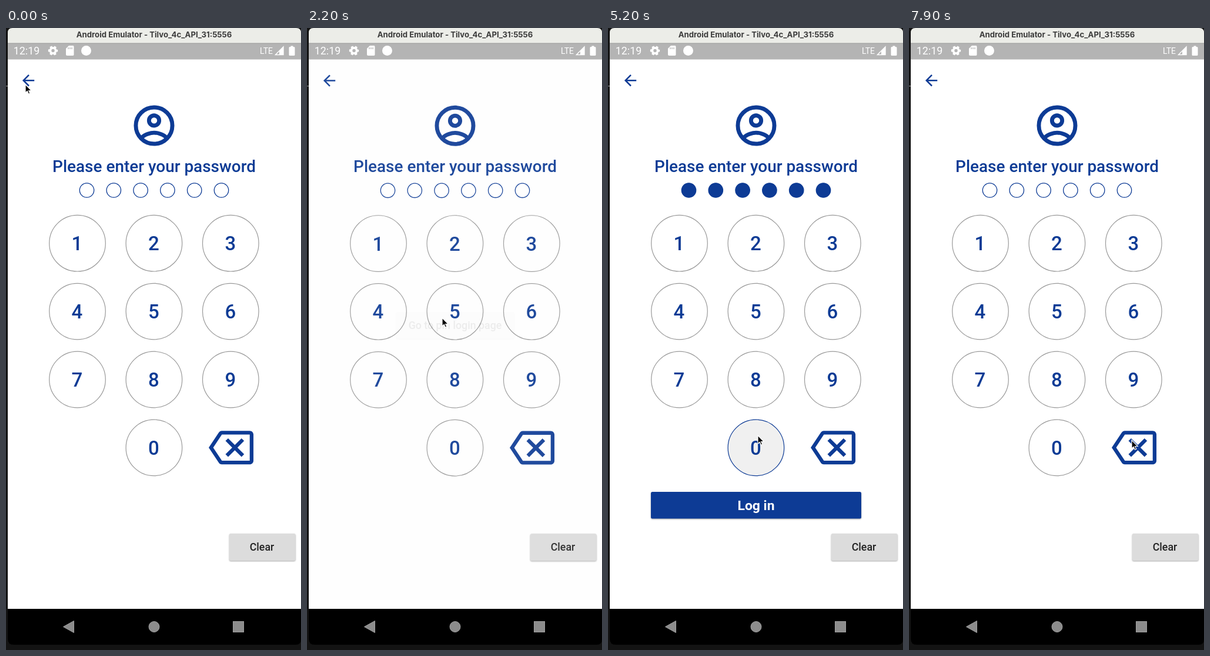
These frames come from a looping animation (502 by 1058 pixels, 8000 ms). An HTML page:

```html
<!DOCTYPE html>
<html lang="en">
<head>
<meta charset="utf-8">
<title>PIN login</title>
<style>
html, body { margin: 0; width: 100%; height: 100%; overflow: hidden; background: #121212; }
svg { display: block; }
text { font-family: Roboto, sans-serif; font-weight: 500; text-anchor: middle; }
.blue { fill: #0d3b95; }
.raised { filter: drop-shadow(0 1.5px 1.2px rgba(0, 0, 0, .35)); }
.label { font-size: 17.8px; fill: #222; }
</style>
</head>
<body>
<svg width="502" height="1058" viewBox="0 0 502 1058">
  <defs><clipPath id="screen"><rect x="3" y="26" width="499" height="962"/></clipPath></defs>
  <rect width="502" height="1058" fill="#131313"/>
  <rect y="98" width="3" height="1.5" fill="#777"/>
  <path d="M3 900H502V1040Q502 1049 493 1049H13Q3 1049 3 1039Z"/>
  <path d="M3 26V8Q3 0 11 0H494Q502 0 502 8V26Z" fill="#ecede8"/>
  <text x="252" y="16" style="font:700 13.2px Inter,sans-serif" fill="#3b3b3b">Android Emulator - Tilvo_4c_API_31:5556</text>

  <g clip-path="url(#screen)">
    <rect x="3" y="26" width="499" height="962" fill="#fafafa"/>
    <rect id="homeButton" class="raised" x="152" y="483" width="200.500" height="45.500" rx="2.500"/>
    <text class="label" x="252" y="512">Go to pin login page</text>
    <g id="page">
      <rect x="3" y="26" width="499" height="962" fill="#fff"/>
      <path class="blue" transform="translate(22.800 74) scale(1.270)" d="M20 11H7.830l5.590-5.590L12 4l-8 8 8 8 1.410-1.410L7.830 13H20v-2z"/>
      <g transform="translate(252 166) scale(3.450)" fill="none" stroke="#0d3b95" stroke-width="2">
        <circle r="9"/>
        <circle cy="-2.500" r="2.500"/>
        <path d="M-6 5.900C-4.800 4.300 -1.600 3.500 0 3.500S4.800 4.300 6 5.900"/>
      </g>
      <text class="blue" x="252" y="245" font-size="27.900">Please enter your password</text>
      <g id="dots" stroke="#0d3b95" stroke-width="1.300"></g>
      <g id="keys"></g>
      <path class="blue" transform="translate(345 675.700) scale(3.170)" d="M22 3H7c-.69 0-1.230.35-1.590.88L0 12l5.410 8.110c.36.53.9.89 1.590.89h15c1.100 0 2-.9 2-2V5c0-1.100-.9-2-2-2zm0 16H7.070L2.400 12l4.660-7H22v14zm-11.590-2L14 13.410 17.590 17 19 15.590 15.410 12 19 8.410 17.590 7 14 10.590 10.410 7 9 8.410 12.590 12 9 15.590z"/>
      <g id="login">
        <rect class="blue raised" x="73" y="789" width="358" height="45.500" rx="2.500"/>
        <text x="252" y="820" font-size="22.900" style="font-weight:700" fill="#fff">Log in</text>
      </g>
      <rect class="raised" x="380" y="860" width="112.500" height="46" rx="2.500" fill="#dcdcdc"/>
      <text class="label" x="435.500" y="889">Clear</text>
    </g>
    <rect x="3" y="26" width="499" height="27.500" opacity=".295"/>
  </g>
  <rect x="3" y="25.500" width="499" height="1" fill="#999"/>

  <g fill="#fff">
    <text x="35" y="45" font-size="17.800" style="font-weight:400">12:19</text>
    <text x="443" y="44" font-size="14" style="font-weight:400">LTE</text>
    <g fill="none" stroke="#fff">
      <circle cx="80" cy="38.500" r="4.600" stroke-width="3.800"/>
      <circle cx="80" cy="38.500" r="6.900" stroke-width="2.600" stroke-dasharray="4 3.225" stroke-dashoffset="2"/>
      <path d="M458.500 45.500L472 32V45.500Z" stroke-width="1.400"/>
    </g>
    <path d="M465 39L472 32V45.500H465Z"/>
    <path d="M107 30H114Q115.500 30 115.500 32V45Q115.500 47 114 47H104Q102 47 102 45V35Z"/>
    <path d="M106 33v3M109 33v3M112 33v3" stroke="#b4b4b4" stroke-width="1.300"/>
    <circle cx="136.500" cy="38.500" r="8.500"/>
    <path d="M484.500 30.500H488.500V32H490Q491.500 32 491.500 33.500V45.500Q491.500 47 490 47H483Q481.500 47 481.500 45.500V33.500Q481.500 32 483 32H484.500Z"/>
  </g>

  <g fill="#8c8c8c" stroke="#a0a0a0">
    <path d="M97.500 1018.500L115.500 1008.500V1028.500Z"/>
    <circle cx="252" cy="1018.500" r="9"/>
    <rect x="386.500" y="1009.500" width="18" height="18"/>
  </g>
  <path id="cursor" d="M0 0V14.300L3.300 11.300 5.400 16.300 7.800 15.300 5.700 10.500H10.200Z" stroke="#fff" stroke-width="1.200"/>
</svg>
<script>
const LOOP = 8000, STEP = 100, BLUE = "#0d3b95";
const $ = id => document.getElementById(id);
const clamp = (x, lo = 0, hi = 1) => Math.min(hi, Math.max(lo, x));
const ramp = (t, from, to) => clamp((t - from) / (to - from));

function bezier(x1, y1, x2, y2) {
  const at = (a, b, u) => 3 * a * u * (1 - u) ** 2 + 3 * b * u * u * (1 - u) + u ** 3;
  return x => {
    let lo = 0, hi = 1;
    for (let i = 0; i < 24; i++) {
      const mid = (lo + hi) / 2;
      if (at(x1, x2, mid) < x) lo = mid; else hi = mid;
    }
    return at(y1, y2, hi);
  };
}
const slideEase = bezier(.4, 0, .2, 1);
const fadeEase = bezier(.42, 0, 1, 1);
const moveEase = bezier(.4, 0, .6, 1);

for (let i = 0; i < 6; i++)
  $("dots").innerHTML += `<circle cx="${137.5 + 45.8 * i}" cy="276" r="12.2"/>`;

[1, 2, 3, 4, 5, 6, 7, 8, 9, 0].forEach((digit, i) => {
  const x = 121.5 + 130.4 * (digit ? i % 3 : 1);
  const y = 366.2 + 115.9 * Math.floor(i / 3);
  $("keys").innerHTML += `<circle cx="${x}" cy="${y}" r="47.8" fill="#fff" stroke="#999" stroke-width="1.2"/>
    <text class="blue" x="${x - .5}" y="${y + 12}" font-size="33">${digit}</text>`;
});
const zeroKey = $("keys").querySelector("circle:last-of-type");

// Pointer stops: time, x, y
const stops = [
  [0, 33, 96], [600, 33, 96], [800, 133, 348], [900, 133, 348], [1200, 247, 468],
  [1400, 229, 490], [1500, 229, 490], [1700, 230, 493], [2500, 230, 493],
  [3400, 255, 693], [5700, 255, 693], [6200, 379, 701], [LOOP, 379, 701]
];

function pointerAt(t) {
  const i = stops.findIndex(s => s[0] > t);
  const [t0, x0, y0] = stops[i - 1], [t1, x1, y1] = stops[i];
  const k = moveEase(ramp(t, t0, t1));
  return [x0 + (x1 - x0) * k, y0 + (y1 - y0) * k];
}

function draw(t) {
  const shown = t < 1000 ? 1 - ramp(t, 32, 332) : ramp(t, 1915, 2215);
  $("page").setAttribute("opacity", fadeEase(shown));
  $("page").setAttribute("transform", `translate(0 ${240 * (1 - slideEase(shown))})`);
  $("homeButton").setAttribute("fill", t >= 1900 && t < 2200 ? "#cfcfcf" : "#dcdcdc");

  const typed = clamp(Math.floor((t - 3940) / 140), 0, 6);
  const erased = clamp(Math.floor((t - 6520) / 180), 0, 6);
  [...$("dots").children].forEach((dot, i) =>
    dot.setAttribute("fill", i < typed - erased ? BLUE : "#fff"));
  $("login").setAttribute("opacity", ramp(t, 4800, 5000) * (1 - ramp(t, 6600, 6800)));

  const pressed = ramp(t, 3900, 4100) * (1 - ramp(t, 5200, 5700));
  const focus = ramp(t, 3900, 4100) * (1 - ramp(t, 5900, 7300));
  zeroKey.setAttribute("fill", `rgb(${[0, 0, 0].map(() => 255 - 15 * pressed)})`);
  zeroKey.setAttribute("stroke", `color-mix(in srgb, ${BLUE} ${focus * 100}%, #999)`);
  zeroKey.style.stroke = zeroKey.getAttribute("stroke");

  $("cursor").setAttribute("transform", `translate(${pointerAt(t)})`);
}

function tick() {
  const t = performance.now() % LOOP;
  draw(Math.floor(t / STEP) * STEP);
  requestAnimationFrame(tick);
}
tick();
</script>
</body>
</html>
```
